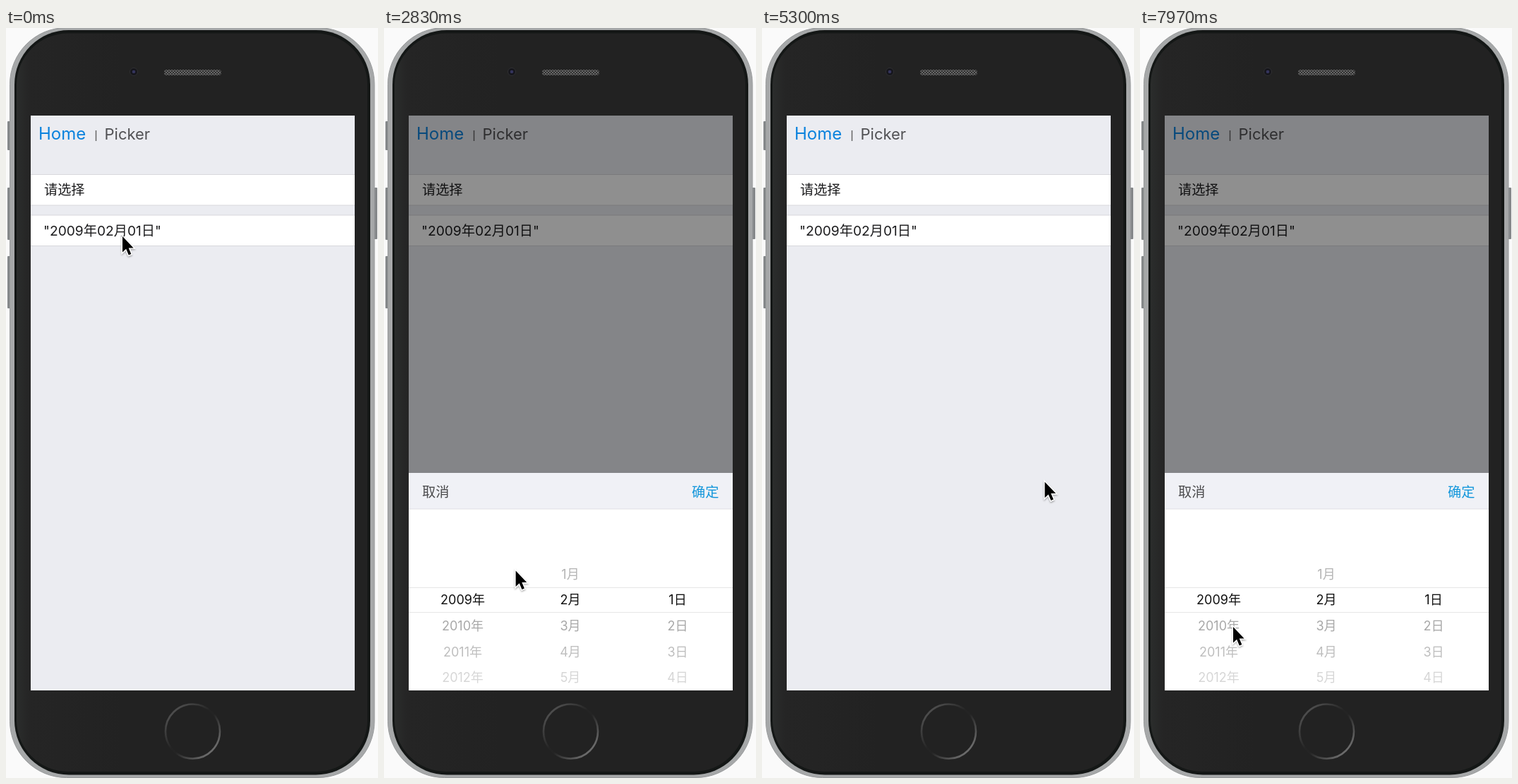
Recreate the animation shown at these times as an HTML page. Size 527 by 1062 pixels, loop 8000 ms.

```html
<!DOCTYPE html>
<html lang="zh-CN">
<head>
<meta charset="utf-8">
<title>Picker</title>
<style>
  html, body { margin: 0; width: 100%; height: 100%; overflow: hidden; background: #fafafa; }
  svg { display: block; width: 100%; height: 100%; }
  text { font-family: Inter, "Noto Sans CJK SC", "Noto Sans CJK", sans-serif; font-size: 19.2px; fill: #1c1c1e; }
  .wheel text { font-size: 18px; text-anchor: middle; }
</style>
</head>
<body>
<svg viewBox="0 0 527 1062">
  <defs>
    <clipPath id="screen"><rect x="35" y="124" width="459" height="814"/></clipPath>
    <linearGradient id="face">
      <stop offset="0" stop-color="#2b2d2c"/>
      <stop offset=".035" stop-color="#252525"/>
      <stop offset=".3" stop-color="#222"/>
      <stop offset="1" stop-color="#222"/>
    </linearGradient>
    <linearGradient id="ring" x2="1" y2="1">
      <stop offset=".15" stop-color="#4c4c4c"/>
      <stop offset=".46" stop-color="#242424"/>
      <stop offset=".54" stop-color="#242424"/>
      <stop offset=".85" stop-color="#6a6a6a"/>
    </linearGradient>
    <pattern id="mesh" width="4" height="4" patternUnits="userSpaceOnUse">
      <rect width="4" height="4" fill="#303030"/>
      <path d="M0 0h2v2h2v2h-2v-2h-2z" fill="#686868"/>
    </pattern>
    <filter id="shadow" x="-50%" y="-50%" width="200%" height="200%">
      <feDropShadow dx="0" dy="1.5" stdDeviation="1.2" flood-opacity=".35"/>
    </filter>
  </defs>

  <g fill="#85888a">
    <rect x="2" y="132" width="5" height="41" rx="1"/>
    <rect x="2" y="226" width="5" height="74" rx="1"/>
    <rect x="2" y="323" width="5" height="74" rx="1"/>
    <rect x="520" y="226" width="6" height="73" rx="1"/>
  </g>
  <rect x="5.5" y="-.5" width="516.5" height="1062" rx="80" fill="#a6a8a9" stroke="#989a9b"/>
  <rect x="12" y="3" width="504" height="1054.5" rx="77" fill="#141716"/>
  <rect x="15" y="7.5" width="497" height="1045.5" rx="73" fill="url(#face)"/>
  <circle cx="181" cy="62" r="5.5" fill="#16161c" stroke="#303032"/>
  <circle cx="181" cy="62" r="2.3" fill="#34345c"/>
  <rect x="224" y="59" width="81" height="8" rx="4" fill="url(#mesh)"/>
  <circle cx="264.5" cy="996" r="38.5" fill="none" stroke="url(#ring)" stroke-width="2.6"/>

  <g clip-path="url(#screen)">
    <rect x="35" y="124" width="459" height="814" fill="#ebecf1"/>
    <text x="46" y="158" style="font-size:24px;fill:#0a82dd">Home</text>
    <path d="M127.5 145v15" stroke="#666" stroke-width="1.5"/>
    <text x="139.5" y="158" style="font-size:22px;fill:#515154">Picker</text>
    <g fill="#fff" stroke="#d8d8dc">
      <rect x="34" y="207.5" width="461" height="43.5"/>
      <rect x="34" y="265" width="461" height="43.5"/>
    </g>
    <text x="54" y="236">请选择</text>
    <text x="53" y="293.5">"2009年02月01日"</text>
    <rect id="mask" x="35" y="124" width="459" height="814"/>

    <g id="panel">
      <rect x="35" width="459" height="308" fill="#fff"/>
      <rect x="35" width="459" height="51" fill="#f0f1f6"/>
      <path d="M35 51h459" stroke="#dfdfe4"/>
      <path d="M35 162.5h459M35 197.5h459" stroke="#e6e6e6"/>
      <text x="54" y="33.5" style="fill:#4a4a4c">取消</text>
      <text x="436" y="33.5" style="fill:#1296db">确定</text>
      <g class="wheel" id="wheel"></g>
    </g>
  </g>

  <path id="cursor" d="M0 0V22.5L5.1 17.7L8.8 26.4L12.3 24.9L8.7 16.4H15.6Z" fill="#000"
        stroke="#fff" stroke-width="2.8" paint-order="stroke" filter="url(#shadow)"/>
</svg>

<script>
const LOOP = 8000, SLIDE = 308, SCREEN_BOTTOM = 938, DIM = 0.44, FADE_TIME = 300;
const el = id => document.getElementById(id);

// Each column: centre, first value, index of its first row, unit.
const rows = [
  { offset: -36, color: '#b4b4b4' }, { offset: 0, color: '#111' },
  { offset: 37, color: '#a8a8a8' }, { offset: 73.5, color: '#bebebe' }, { offset: 110, color: '#d6d6d6' }
];
for (const [x, first, start, unit] of [[111.5, 2009, 1, '年'], [264, 1, 0, '月'], [416, 1, 1, '日']])
  rows.slice(start).forEach(({ offset, color }, i) => {
    const label = document.createElementNS('http://www.w3.org/2000/svg', 'text');
    label.setAttribute('x', x);
    label.setAttribute('y', 186.3 + offset);
    label.style.fill = color;
    label.textContent = first + i + unit;
    el('wheel').append(label);
  });

// Cursor tip as [time, x, y].
const path = [
  [0, 165, 295], [700, 165, 295], [1500, 169.5, 291], [2080, 169.5, 291],
  [2500, 180, 690], [2900, 188, 785], [3330, 320, 778], [3770, 359, 728],
  [4350, 443, 660], [5000, 443, 660], [5250, 425, 652], [5480, 315, 610],
  [5740, 277, 450], [6000, 305, 330], [6300, 321, 266], [6620, 284.5, 292.5],
  [6950, 284.5, 292.5], [7400, 210, 690], [7850, 132, 848], [LOOP, 132, 848]
];

function cursorAt(t) {
  const i = path.findIndex(p => p[0] > t);
  const [t0, x0, y0] = path[i - 1], [t1, x1, y1] = path[i];
  const k = (t - t0) / (t1 - t0);
  return [x0 + (x1 - x0) * k, y0 + (y1 - y0) * k];
}

// The CSS "ease" curve, cubic-bezier(.25, .1, .25, 1).
function ease(x) {
  if (x <= 0) return 0;
  if (x >= 1) return 1;
  const bezier = (s, a, b) => 3 * a * s * (1 - s) ** 2 + 3 * b * s * s * (1 - s) + s ** 3;
  let low = 0, high = 1;
  for (let i = 0; i < 20; i++) {
    const mid = (low + high) / 2;
    if (bezier(mid, .25, .25) < x) low = mid; else high = mid;
  }
  return bezier(low, .1, 1);
}

const shown = (t, open, close, reopen) => {
  const step = start => ease((t - start) / FADE_TIME);
  return step(open) - step(close) + step(reopen);
};

function draw(now) {
  const t = now % LOOP;
  el('mask').setAttribute('opacity', DIM * shown(t, 1673, 4814, 6760));
  el('panel').setAttribute('transform', `translate(0 ${SCREEN_BOTTOM - SLIDE * shown(t, 1763, 4590, 6850)})`);
  el('cursor').setAttribute('transform', `translate(${cursorAt(t)})`);
  requestAnimationFrame(() => draw(performance.now()));
}
draw(0);
</script>
</body>
</html>
```
